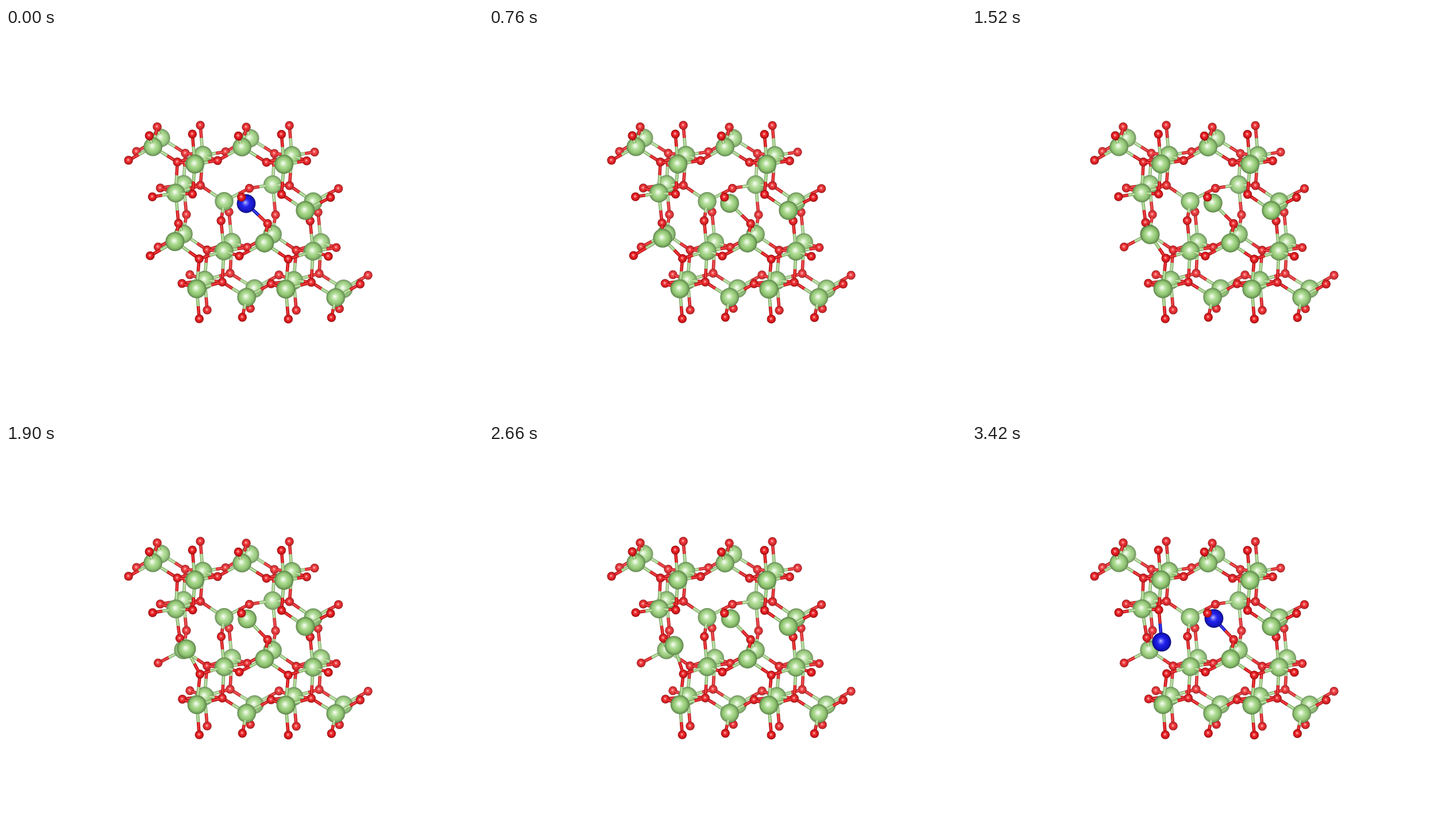
Recreate the animation shown at these times as an HTML page with a canvas. Size 830 by 674 pixels, loop 3.8 s.

```html
<!DOCTYPE html>
<html lang="en">
<head>
<meta charset="utf-8">
<title>Crystal framework</title>
<style>
  html, body { margin: 0; width: 100%; height: 100%; overflow: hidden; background: #fff; }
  canvas { display: block; width: 830px; height: 674px; }
</style>
</head>
<body>
<canvas id="stage" width="830" height="674"></canvas>
<script>
const ctx = document.getElementById('stage').getContext('2d');
const STEP = 380, STEPS = 10;

// Lattice: sideways repeat, screen shift and true depth of one layer, inversion sum.
const repeat = { x: 155, y: .5 };
const layer = { x: -13.8, y: 15.3, depth: 81 };
const inversion = { x: 857, y: 644 };
const MAX_BOND = 60;

// Independent sites of the cell; the lattice rules give every other atom.
const sites = [
  { kind: 'metal', x: 269.5, y: 191, z: 0 },
  { kind: 'metal', x: 349.4, y: 213.3, z: .5 },
  { kind: 'metal', x: 309, y: 271.5, z: 0 },
  { kind: 'metal', x: 386.5, y: 293.5, z: .5 },
  { kind: 'oxygen', x: 270, y: 164, z: .5 },
  { kind: 'oxygen', x: 227, y: 214.5, z: 0, copies: 3 },
  { kind: 'oxygen', x: 312, y: 217.5, z: 0 },
  { kind: 'oxygen', x: 345, y: 161.3, z: .5 },
  { kind: 'oxygen', x: 275.4, y: 270.3, z: .5, copies: 3 },
  { kind: 'oxygen', x: 345.2, y: 265.6, z: .5 },
  { kind: 'oxygen', x: 314, y: 324, z: 0 }
];

const hopper = { from: { x: 294, y: 371, z: 1.5 }, to: { x: 330, y: 344, z: 1.7 } };
const guest = { from: { x: 418, y: 305, z: 1.25 }, to: { x: 421, y: 303, z: 1.25 } };

const looks = {
  metal: {
    ball: ['#ffffff', '#e2f3d8', '#a9d98d', '#8fc471', '#6f9c58', '#557a43'],
    rod: ['#73985f', '#9ccb7f', '#c2e3ad']
  },
  oxygen: {
    ball: ['#ffdede', '#fb8080', '#e8262a', '#d6171b', '#ae1013', '#780a0b'],
    rod: ['#a31013', '#de181c', '#f04446']
  },
  blue: {
    ball: ['#d2d2ff', '#7a7aff', '#2020ea', '#1515d2', '#0e0ea6', '#080868'],
    rod: ['#0c0c8c', '#1616d8', '#4a4af2']
  }
};
const stops = [0, .13, .42, .7, .9, 1];
const rodWidths = [5.6, 4, 1.5];

const lerp = (a, b, t) => a + (b - a) * t;
const gap = (a, b) => Math.hypot(a.x - b.x, a.y - b.y);
const along = (path, t) => ({
  x: lerp(path.from.x, path.to.x, t),
  y: lerp(path.from.y, path.to.y, t),
  z: lerp(path.from.z, path.to.z, t)
});

function atom(kind, x, y, z) {
  return { kind, x, y, z, r: kind === 'oxygen' ? 7.7 : 16 + z * .3 };
}

function buildLattice() {
  const atoms = [];
  for (const s of sites) {
    for (const z of [s.z, s.z + 1]) {
      const add = (x, y) => atoms.push(atom(s.kind, x + layer.x * z, y + layer.y * z, z));
      for (let n = 0; n < (s.copies || 2); n++) {
        const x = s.x + repeat.x * n, y = s.y + repeat.y * n;
        add(x, y);
        add(inversion.x - x, inversion.y - y);
      }
    }
  }
  // Clear the sites of the hopping atom and of the two vacancies around the guest.
  return atoms.filter(a => a.kind === 'oxygen' || a.z < 1 ||
    (gap(a, guest.from) > 60 && gap(a, hopper.from) > 20));
}
const lattice = buildLattice();

// Near neighbours are dragged a little by the hopping atom.
function dragged(a, t) {
  if (a.z < 1) return a;
  const pull = .15 * t * Math.exp(-((gap(a, hopper.from) / 60) ** 2));
  return {
    ...a,
    x: a.x + (hopper.to.x - hopper.from.x) * pull,
    y: a.y + (hopper.to.y - hopper.from.y) * pull
  };
}

// Length in space, with the skew between layers taken out.
function spaceLength(a, b) {
  const dz = b.z - a.z;
  return Math.hypot(b.x - a.x - layer.x * dz, b.y - a.y - layer.y * dz, layer.depth * dz);
}

const haze = z => `rgba(255,255,255,${Math.max(0, .12 * (1 - z / 1.5))})`;

function drawBall({ x, y, z, r, kind }) {
  const g = ctx.createRadialGradient(x - r * .1, y - r * .12, 0, x, y, r);
  looks[kind].ball.forEach((c, i) => g.addColorStop(stops[i], c));
  ctx.beginPath();
  ctx.arc(x, y, r, 0, 2 * Math.PI);
  for (const fill of [g, haze(z)]) {
    ctx.fillStyle = fill;
    ctx.fill();
  }
}

// The two halves meet at the middle of the part outside both balls.
function drawBond({ a, b, len, z }) {
  const mid = (len + a.r - b.r) / 2;
  const half = (from, to, kind) => {
    const line = (width, color) => {
      ctx.lineWidth = width;
      ctx.strokeStyle = color;
      ctx.beginPath();
      for (const d of [from, to]) ctx.lineTo(lerp(a.x, b.x, d / len), lerp(a.y, b.y, d / len));
      ctx.stroke();
    };
    rodWidths.forEach((w, i) => line(w, looks[kind].rod[i]));
    line(rodWidths[0], haze(z));
  };
  half(a.r * .95, mid, a.kind);
  half(mid, len - b.r * .9, b.kind);
}

function draw(k) {
  const t = k / (STEPS - 1), last = k === STEPS - 1;
  const hop = along(hopper, t), mid = along(guest, t);
  const atoms = lattice.map(a => dragged(a, t));
  atoms.push(
    atom(last ? 'blue' : 'metal', hop.x, hop.y, hop.z),
    atom(last || k === 0 ? 'blue' : 'metal', mid.x, mid.y, mid.z)
  );

  const oxygens = atoms.filter(a => a.kind === 'oxygen');
  const metals = atoms.filter(a => a.kind !== 'oxygen');
  const bonds = [];
  for (const a of metals) {
    for (const b of oxygens) {
      const len = spaceLength(a, b);
      if (len < MAX_BOND) bonds.push({ a, b, len, z: (a.z + b.z) / 2, paint: drawBond });
    }
  }

  // Oxygen without a bond is not shown. Bonds come first at equal depth.
  const bound = new Set(bonds.map(bond => bond.b));
  const balls = [...metals, ...oxygens.filter(o => bound.has(o))]
    .map(a => ({ ...a, paint: drawBall }));

  ctx.fillStyle = '#fff';
  ctx.fillRect(0, 0, 830, 674);
  [...bonds, ...balls].sort((p, q) => p.z - q.z).forEach(item => item.paint(item));
}

const start = performance.now();
let shown = -1;
function tick() {
  const k = Math.floor((performance.now() - start) / STEP) % STEPS;
  if (k !== shown) draw(shown = k);
  requestAnimationFrame(tick);
}
tick();
</script>
</body>
</html>
```
